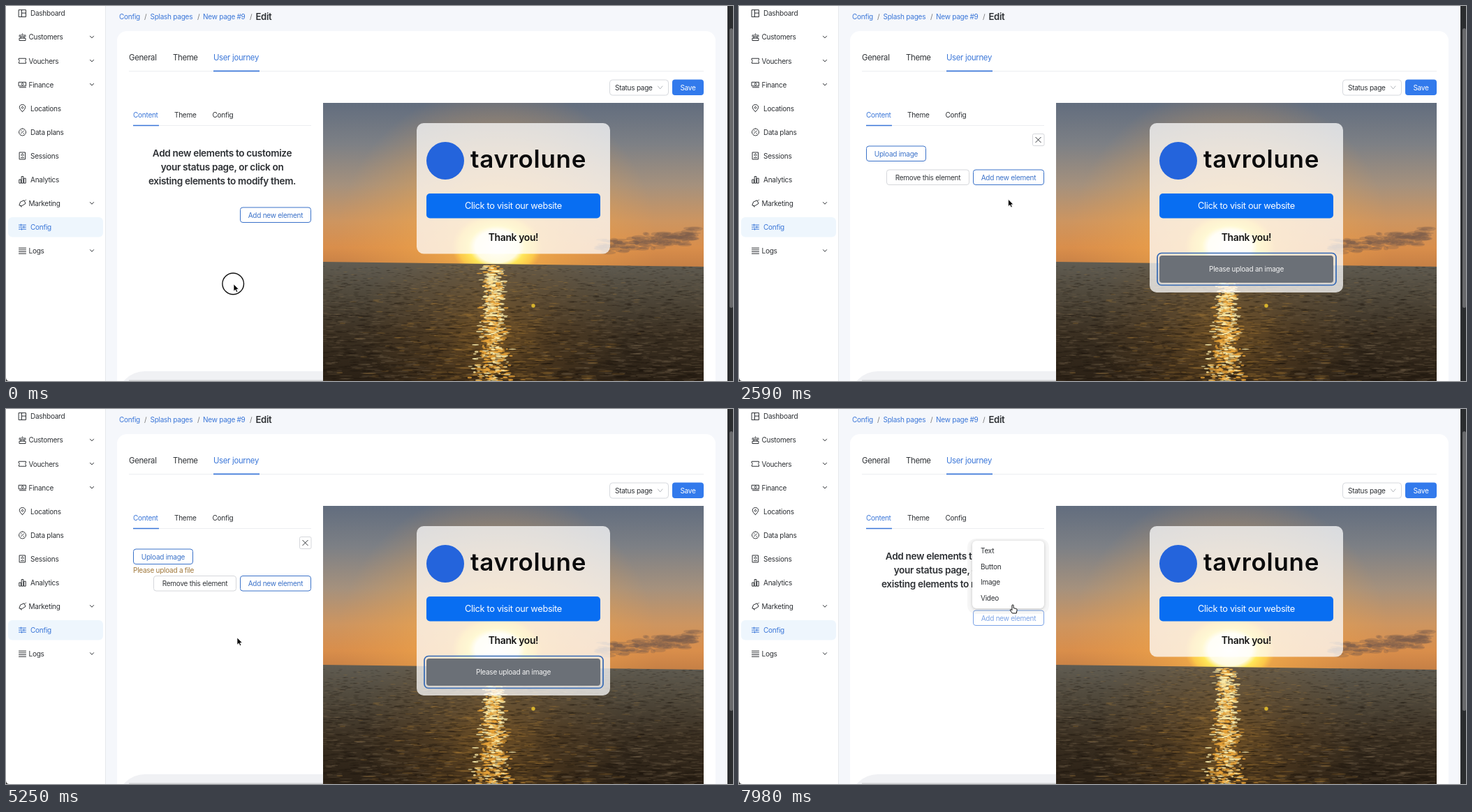
An HTML page with a canvas that plays this animation: 1041 px wide and 538 px high, repeating every 8000 ms.

```html
<!DOCTYPE html>
<html lang="en">
<head>
<meta charset="utf-8">
<title>Splash page editor</title>
<style>
  html, body { margin: 0; width: 100%; height: 100%; overflow: hidden; background: #f5f7fb; }
  canvas, svg { position: absolute; left: 0; top: 0; }
  text { font: 10px Inter, sans-serif; letter-spacing: -.025em; fill: currentColor; white-space: pre; }
  svg { color: #2d3034; }
  .tab { font-size: 11.3px; }
  .head { font-size: 13.6px; font-weight: 600; }
  .cta { font-size: 12.8px; }
  .thanks { font-size: 13.9px; font-weight: 600; }
  .brand { font-size: 35px; font-weight: 600; letter-spacing: .02em; }
  .crumb { font-size: 13.1px; font-weight: 600; }
  .blue { color: #3a76d8; }
  .icon, .line { fill: none; stroke: currentColor; stroke-width: 1; stroke-linecap: round; stroke-linejoin: round; }
  .btn { color: #3b72c9; }
  .btn rect { fill: #fff; stroke: currentColor; }
  .btn.plain { color: #33363a; }
  .btn.plain rect { stroke: #d5d7db; }
  .btn.hover { color: #7ba3e6; }
  .btn.hover rect { stroke: currentColor; }
  .btn.press { color: #2a55a5; }
  .btn.press rect { stroke: currentColor; }
</style>
</head>
<body>
<canvas id="photo" width="1041" height="538"></canvas>
<svg id="ui" width="1041" height="538" viewBox="0 0 1041 538"></svg>
<script>
const $ = id => document.getElementById(id);
const ctx = $('photo').getContext('2d');

let seed = 7;
const rnd = () => (seed = seed * 16807 % 2147483647) / 2147483647;
const spread = () => rnd() + rnd() + rnd() - 1.5;

function box(x, y, w, h, fill, r = 0) {
  ctx.fillStyle = fill;
  ctx.beginPath();
  ctx.roundRect(x, y, w, h, r);
  ctx.fill();
}
function blend(g, colors) {
  colors.forEach(([at, c]) => g.addColorStop(at, c));
  return g;
}
const vertical = (y0, y1, colors) => blend(ctx.createLinearGradient(0, y0, 0, y1), colors);
const glow = (x, y, r, colors) => blend(ctx.createRadialGradient(x, y, 0, x, y, r), colors);
function streak(x, y, rx, ry, color, alpha) {
  ctx.globalAlpha = alpha;
  ctx.fillStyle = color;
  ctx.beginPath();
  ctx.ellipse(x, y, rx, ry, 0, 0, 7);
  ctx.fill();
  ctx.globalAlpha = 1;
}

function paintPage() {
  box(0, 0, 142, 538, '#fff');
  box(142, 0, 1, 538, '#e6e8ec');
  box(159, 36, 857, 520, '#fff', 14);
  box(159, 524, 340, 40, '#f0f1f4', [40, 0, 0, 0]);
  box(176, 536.5, 280, 2, '#d3d4d6');
  box(1033, 0, 8, 538, '#2b2d2f');
  box(1036, 32, 5, 401, '#68696b', 3);
  ctx.fillStyle = '#333';
  ctx.fill(new Path2D('M0 533Q0 538 5 538H0z'));
}

function paintSunset() {
  ctx.save();
  ctx.beginPath();
  ctx.rect(454, 139, 545, 399);
  ctx.clip();
  box(454, 139, 545, 240, vertical(139, 375, [[0, '#626d7e'], [.25, '#7d8085'], [.5, '#a5917d'], [.72, '#cd9560'], [.88, '#d98e4b'], [1, '#c57f45']]));
  box(454, 139, 545, 240, glow(703, 345, 230, [[0, '#ffc24ce6'], [.4, '#f5ab4890'], [1, '#f0a04800']]));
  for (let i = 0; i < 150; i++) {
    const u = rnd();
    streak(852 + u * 136, 346 - u * 17 + spread() * 9, 3 + rnd() * 9, 1 + rnd() * 2.5, '#7a5c4c', .3);
  }
  ctx.save();
  ctx.translate(703, 345);
  ctx.scale(1.35, 1);
  box(-60, -60, 120, 120, glow(0, 0, 48, [[0, '#fff'], [.48, '#fffbe0'], [.62, '#ffe75a'], [.85, '#ffd04acc'], [1, '#ffc04800']]));
  ctx.restore();

  ctx.fillStyle = vertical(367, 538, [[0, '#605c52'], [.25, '#514a3d'], [.6, '#3b3022'], [1, '#2a2015']]);
  ctx.fill(new Path2D('M454 367L999 374V538H454z'));
  ctx.save();
  ctx.clip(new Path2D('M454 367L999 374V538H454z'));
  box(454, 367, 545, 171, glow(698, 470, 190, [[0, '#a8742a80'], [.5, '#80582640'], [1, '#80582600']]));
  for (let i = 0; i < 3600; i++) {
    const d = rnd(), x = 454 + rnd() * 545, near = Math.exp(-(((x - 698) / 120) ** 2));
    const light = rnd() < .4;
    streak(x, 372 + d * 168, 3 + d * 9 * rnd(), .4 + d * rnd(), light ? (near > rnd() ? '#b88436' : '#7c6a50') : '#17110b', light ? .28 : .3);
  }
  for (let i = 0; i < 720; i++) {
    const d = rnd(), w = 9 + 22 * (d - .35) ** 2 + 8 * d;
    streak(698 + spread() * w * 1.25, 372 + d * 166, 1.5 + rnd() * 4, .5 + rnd() * .9, rnd() < .65 - d * .4 ? '#fff0ae' : '#eda638', .75);
  }
  ctx.restore();
  streak(755, 430, 2.7, 2.7, '#d9b52c', 1);
  ctx.restore();
}

const text = (x, y, s, cls = '', more = '') => `<text x="${x}" y="${y}" class="${cls}" ${more}>${s}</text>`;
const middle = 'text-anchor="middle"';
const path = (d, cls = 'line', more = '') => `<path d="${d}" class="${cls}" ${more}/>`;
const rect = (x, y, w, h, r, fill, more = '') => `<rect x="${x}" y="${y}" width="${w}" height="${h}" rx="${r}" fill="${fill}" ${more}/>`;
const button = (id, x, y, w, label) => `<g id="${id}" class="btn">${rect(x + .5, y + .5, w - 1, 21.5, 3.5, '#fff')}${text(x + w / 2, y + 15, label, '', middle)}</g>`;

// Icons live in an 11 x 11 box
const menu = [
  ['Dashboard', 'M.5.5h10v10H.5zM4.5.5v10M4.5 5h6'],
  ['Customers', 'M1 10V7h9v3zM3 7V5h5v2M2 2.5a1.2 1.2 0 1 0 .1 0M5.5 1a1.2 1.2 0 1 0 .1 0M9 2.5a1.2 1.2 0 1 0 .1 0', 1],
  ['Vouchers', 'M.5 2h10v2.2a1.4 1.4 0 0 0 0 2.6V9H.5V6.8a1.4 1.4 0 0 0 0-2.6z', 1],
  ['Finance', 'M.5 2h10v5.5H.5zM5.5 3.2a1.5 1.5 0 1 0 .1 0M1.5 9.5h9', 1],
  ['Locations', 'M5.5 10.5Q1.3 6.5 1.3 4.2a4.2 4 0 0 1 8.4 0Q9.7 6.5 5.5 10.5M5.5 3a1.4 1.4 0 1 0 .1 0'],
  ['Data plans', 'M5.5.5a5 5 0 1 0 .1 0M3.5 7.5l4-4M3.5 3.6h.6M7 7.4h.6'],
  ['Sessions', 'M1.5.5h8v10h-8zM5.5 2.6a1.6 1.6 0 1 0 .1 0M3.5 8.2h4'],
  ['Analytics', 'M.8 10.2V5.5h2.6v4.7zM4.2 10.2V1h2.6v9.2zM7.6 10.2V3.7h2.6v6.5z'],
  ['Marketing', 'M1 8l1.6-4.5L8 1.2l2 4.6-5 3.2zM3 9l1 1.7M9.5 1.5l1-1', 1],
  ['Config', 'M.5 2.5h10M.5 5.5h10M.5 8.5h10M3.5 1.5v2M7.5 4.5v2M4.5 7.5v2'],
  ['Logs', 'M.5 1.5h10M.5 4.2h10M.5 6.9h10M.5 9.6h10', 1]
];
const sidebar = menu.map(([label, icon, nested], i) => {
  const y = 10.6 + i * 34.06;
  return `<g class="${label === 'Config' ? 'blue' : ''}">` +
    path(icon, 'icon', `transform="translate(18 ${y - 5.5})"`) +
    text(nested ? 32.5 : 35, y + 3.8, label) +
    (nested ? path(`M120.5 ${y - 1.5}l2.5 2.7 2.5-2.7`) : '') + '</g>';
}).join('');

$('ui').innerHTML = rect(3, 303, 136, 28.5, 6, '#eef6fd') + sidebar +
  `<g class="blue">${text(162, 19, 'Config')}${text(206.5, 19, 'Splash pages')}${text(282, 19, 'New page #9')}
   ${text(297, 78, 'User journey', 'tab')}${text(182, 159.5, 'Content')}</g>
  <g color="#777">${text(198, 19, '/')}${text(274, 19, '/')}${text(349, 19, '/')}</g>` +
  text(357.5, 19.5, 'Edit', 'crumb') +
  text(176, 78, 'General', 'tab') + text(239, 78, 'Theme', 'tab') +
  text(241, 159.5, 'Theme') + text(295.5, 159.5, 'Config') +
  rect(176, 93, 823, 1, 0, '#eceef1') + rect(297, 92.5, 66, 1.7, 0, '#3a76d8') +
  rect(182, 171, 255, 1, 0, '#eceef1') + rect(182, 170.7, 37, 1.5, 0, '#3a76d8') +
  rect(864.5, 106, 84, 22, 4, '#fff', 'stroke="#d6d9de"') + text(872, 120.5, 'Status page') +
  path('M933.5 115l3.2 4 3.2-4', 'line', 'color="#b5b8bd"') +
  rect(954, 105.5, 45, 22.5, 4, '#327aec') + text(976.5, 120.5, 'Save', '', middle + ' color="#fff"') +

  `<rect id="card" x="588" y="168" width="277" rx="10" fill="#fff" fill-opacity=".74"/>
  <circle cx="629" cy="222" r="27" fill="#2464dc"/>` +
  text(665, 232, 'tavrolune', 'brand', 'color="#0b0b0c"') +
  rect(602, 269, 249, 35.5, 5, '#086ef2') +
  text(726.5, 291.3, 'Click to visit our website', 'cta', middle + ' color="#fff"') +
  text(726.5, 336.8, 'Thank you!', 'thanks', middle + ' color="#151515"') +
  `<g id="placeholder">${rect(599, 354.5, 256, 46, 6, 'none', 'stroke="#3469b5" stroke-width="1.7"')}
   ${rect(602, 358, 249, 39, 4, '#6b7077')}${text(726.5, 381.3, 'Please upload an image', '', middle + ' color="#f4f4f4"')}</g>

  <g id="intro">${['Add new elements to customize', 'your status page, or click on', 'existing elements to modify them.']
    .map((s, i) => text(309.5, 216 + i * 20, s, 'head', middle)).join('')}</g>
  <g id="editor">
    <g id="close" class="btn plain">${rect(420.5, 183.5, 16.5, 17, 2, '#fff')}${path('M424.8 188.3l7.4 7.4M432.2 188.3l-7.4 7.4', 'line', 'stroke-width="1.2"')}</g>
    ${button('upload', 182, 200.5, 86, 'Upload image')}
    <g id="error" color="#a0783c">${text(182, 234.8, 'Please upload a file')}</g>
    ${button('remove', 211, 234.5, 119, 'Remove this element')}
  </g>` +
  button('add', 335, 0, 102, 'Add new element') +
  `<g id="dropdown">${rect(327, 186, 117, 108, 12, '#000', 'fill-opacity=".035"')}
   ${rect(334, 189, 103, 97, 6, '#fff', 'style="filter:drop-shadow(0 1px 2px #0003)"')}
   <rect id="row" x="337" width="97" height="23" rx="3" fill="#f4f4f5"/>
   ${['Text', 'Button', 'Image', 'Video'].map((s, i) => text(346, 206.8 + i * 22.7, s)).join('')}</g>

  <g id="cursor">
    <circle id="ring" cx="-.8" cy="-.5" r="15.3" fill="none" stroke="#111" stroke-width="1.4"/>
    <path id="arrow" d="M0 0V10.2L2.4 8.1 4 11.6 5.7 10.8 4.2 7.5H7.3z" fill="#000" stroke="#fff" stroke-width=".7"/>
    <path id="hand" d="M-1.1 1a1.1 1.1 0 0 1 2.2 0V4.6L4.6 5.4Q6.4 5.8 6.1 7.5L5.2 12H-.6L-3.6 8Q-4 6.4-2.4 6.8L-1.1 7.8z" fill="#fff" stroke="#111" stroke-width="1"/>
  </g>`;

// Pointer tip: time, x, y
const track = [
  [0, 326, 399], [350, 326, 399], [1190, 385, 297], [1400, 386, 292], [1890, 389, 250], [2240, 389, 250],
  [2800, 384, 290], [3010, 372, 290], [3500, 280, 242], [3920, 280, 242], [4340, 428, 190], [4620, 428, 190],
  [5250, 331, 328], [5460, 331, 328], [6090, 291, 246], [6440, 291, 246], [7070, 271, 289], [7350, 271, 289],
  [7770, 388, 295], [7980, 392, 281]
];
function pointer(t) {
  const i = track.findIndex(k => k[0] > t);
  if (i < 0) return track[track.length - 1].slice(1);
  const [t0, x0, y0] = track[i - 1], [t1, x1, y1] = track[i];
  const u = (t - t0) / (t1 - t0), e = u * u * (3 - 2 * u);
  return [x0 + (x1 - x0) * e, y0 + (y1 - y0) * e];
}

const show = (id, on) => $(id).style.display = on ? '' : 'none';

function draw(t) {
  const [x, y] = pointer(t);
  const over = (l, top, r, b) => x >= l && x <= r && y >= top && y <= b;
  const editing = t >= 2170 && t < 6300;
  const failed = editing && t >= 4480;
  const open = t >= 1190 && t < 2170 || t >= 7700;
  const shift = failed ? 4.5 : 0;
  const addY = editing ? 234.5 + shift : 288.5;

  const onAdd = over(335, addY - (editing ? 0 : 8), 437, addY + 23);
  const onRemove = editing && over(211, 234 + shift, 330, 257 + shift);
  const onClose = editing && over(420, 183, 437, 201);
  const onMenu = open && over(334, 189, 437, 280);

  show('intro', !editing);
  show('editor', editing);
  show('placeholder', editing);
  show('error', failed);
  show('dropdown', open);
  show('row', onMenu);
  $('card').setAttribute('height', editing ? 243 : 187.5);
  $('row').setAttribute('y', 192 + 22.7 * Math.floor((y - 192) / 22.7));
  $('add').setAttribute('transform', `translate(0 ${addY})`);
  $('remove').setAttribute('transform', `translate(0 ${shift})`);
  $('add').setAttribute('class', onAdd ? 'btn hover' : 'btn');
  $('remove').setAttribute('class', 'btn ' + (!onRemove ? 'plain' : t >= 6160 ? 'press' : 'hover'));
  $('close').setAttribute('class', 'btn plain' + (onClose ? ' hover' : ''));

  const hand = onAdd || onRemove || onClose || onMenu;
  show('hand', hand);
  show('arrow', !hand);
  show('ring', t < 70);
  $('cursor').setAttribute('transform', `translate(${x} ${y})`);
}

paintPage();
paintSunset();

const LOOP = 8000, STEP = 70;
function tick() {
  draw(Math.floor(performance.now() % LOOP / STEP) * STEP);
  requestAnimationFrame(tick);
}
tick();
</script>
</body>
</html>
```
